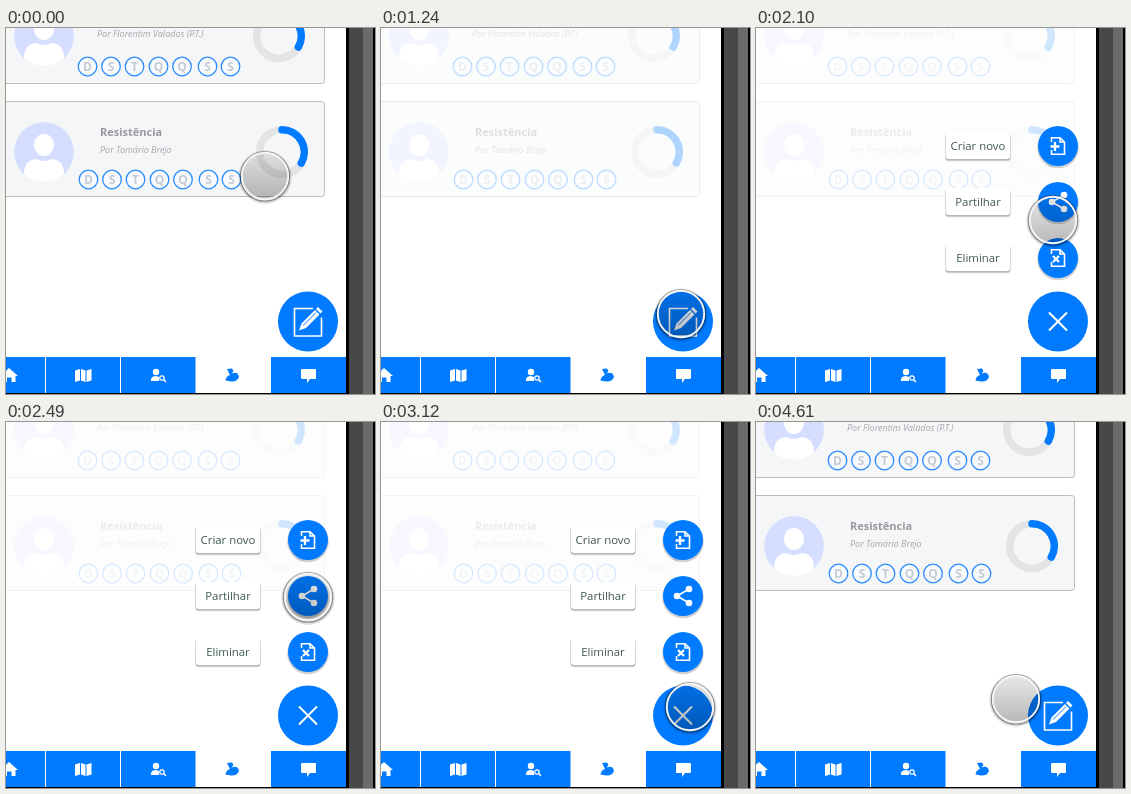
These frames come from a looping animation (369 px wide and 366 px high, 4680 ms). An HTML page:

```html
<!DOCTYPE html>
<html lang="pt">
<head>
<meta charset="utf-8">
<title>Treinos</title>
<style>
html, body { margin: 0; height: 100%; overflow: hidden; background: #fff; }
svg { display: block; width: 100vw; height: 100vh; font-family: "Open Sans", "Noto Sans", sans-serif; }
.title { font-size: 11px; font-weight: 700; fill: #98989c; }
.author { font-size: 9px; font-style: italic; fill: #a6a6aa; }
.day { font-size: 12px; font-weight: 700; fill: #c6cad2; text-anchor: middle; }
.label { font-size: 11.4px; fill: #3d5a4a; text-anchor: middle; }
.line { fill: none; stroke: #fff; stroke-width: 1.6; }
</style>
</head>
<body>
<svg viewBox="0 0 369 366" preserveAspectRatio="none">
  <defs>
    <linearGradient id="glass" x2="0" y2="1">
      <stop offset="0" stop-opacity=".09"/>
      <stop offset="1" stop-opacity=".28"/>
    </linearGradient>
    <clipPath id="disc"><circle r="30"/></clipPath>
  </defs>

  <g id="cards"></g>

  <g id="tabs" fill="#fff">
    <path fill="#007bff" d="M0 329H340V365H0Z"/>
    <path d="M39 329h1v36h-1zM114 329h1v36h-1zM189.500 329H265v36h-75.500z"/>
    <path d="M3 340L12 348H9.500V354H5.500V349.500H1V354H-4V348H-6Z"/>
    <path d="M69 342.500L74 341V352.500L69 354ZM75 341L79.500 342.500V354L75 352.500ZM80.500 342.500L85.500 341V352.500L80.500 354Z"/>
    <circle cx="150" cy="344" r="3.200"/>
    <path d="M145 353V351Q146 348 150 348L153 349V353Z"/>
    <circle cx="156" cy="350" r="2.200" fill="none" stroke="#fff" stroke-width="1.200"/>
    <path d="M157.500 351.500L160 354" stroke="#fff" stroke-width="1.400"/>
    <path fill="#007bff" d="M221 341L226 340.500 227.500 343 225.500 345.500Q232 343 233 349Q231 354 225 353.500L219.500 352.500Q220 348 224 347L222.500 344Z"/>
    <path d="M296 341H309Q310 341 310 342V350Q310 351 309 351H304L301 355V351H296Q295 351 295 350V342Q295 341 296 341Z"/>
  </g>

  <g id="bezel">
    <path d="M340 0H369V366H0V365H340Z"/>
    <path fill="#484848" d="M343 0H357V366H343Z"/>
    <path fill="#6a6a6a" d="M357 0H367V366H357Z"/>
  </g>

  <g id="menu"></g>

  <g transform="translate(302 293.500)">
    <circle r="30" fill="#007bff"/>
    <g id="pencil">
      <path class="line" stroke-width="2" d="M5-13H-13.500V14.500H13.500V-4"/>
      <path fill="#fff" d="M-9 9L-6.500 2 7-11.500 11.500-7-2 6.500Z"/>
      <path fill="#fff" d="M8-12.500L10-14.500 14.500-10 12.500-8Z"/>
      <path d="M-5 4L8-9" stroke="#007bff" fill="none"/>
    </g>
    <path id="cross" class="line" style="stroke-width:2" d="M-9-9L9 9M9-9L-9 9"/>
  </g>

  <g id="pointer">
    <g fill="none" stroke="#000">
      <circle cy="1.200" r="25.200" stroke-width="3" opacity=".12"/>
      <circle cy=".6" r="24.500" stroke-width="1.500" opacity=".4"/>
    </g>
    <circle r="24" fill="url(#glass)"/>
    <circle r="23.200" fill="none" stroke="#f6f6f6" stroke-width="1.900"/>
    <circle id="press" cy="2" r="11.500" opacity=".18"/>
  </g>
</svg>

<script>
const LOOP = 4680, TICK = 78;
const $ = id => document.getElementById(id);
const clamp = x => Math.max(0, Math.min(1, x));

// shared artwork
const days = [...'DSTQQSS'];
const dayX = [0, 23.5, 47, 71, 94.5, 120, 143];

function card(y, h, x, mid, dayY, ringX, title, author, authorX) {
  const chips = days.map((d, i) => `<g transform="translate(${x + dayX[i]} ${dayY})">
    <circle r="9.300" fill="#f8fafc" stroke="#2b8cff" stroke-width="1.300"/>
    <text class="day" y="4.400">${d}</text></g>`).join('');
  return `<rect x="-10" y="${y}" width="328.500" height="${h}" rx="3" fill="#f5f6f8" stroke="#bdbdbd"/>
    <g transform="translate(38 ${mid})" clip-path="url(#disc)">
      <circle r="30" fill="#d6deff"/>
      <ellipse cy="-7" rx="10" ry="11" fill="#fff"/>
      <path d="M-20 31V20Q-19 8-8 7Q0 11 8 7Q19 8 20 20V31Z" fill="#fff"/>
    </g>
    <text class="title" x="94" y="${mid - 16}">${title}</text>
    <text class="author" x="${authorX}" y="${mid + 1}">Por ${author}</text>${chips}
    <g transform="translate(${ringX} ${mid})" fill="none" stroke-width="7.500" stroke-linecap="round">
      <circle r="22.300" stroke="#e3e4e6"/>
      <path d="M0-22.300A22.300 22.300 0 0 1 19.300 11.100" stroke="#007bff"/>
    </g>`;
}

$('cards').innerHTML =
  card(-39.5, 95, 81.5, 8, 38.5, 273, '', 'Florentim Valados (P.T.)', 91) +
  card(73.5, 95, 82.5, 124, 151.5, 276, 'Resistência', 'Tomário Brejo', 94);

const file = mark => `<path class="line" d="M-6.500-4V-8.200H2L6.500-3.800V8.200H-6.500V4M2-8V-4H6"/>
  <path class="line" style="stroke-width:2.300" d="${mark}"/>`;
const share = `<path class="line" d="M6-7L-6 0 6 7"/><g fill="#fff">
  <circle cx="-6" r="3.300"/><circle cx="6" cy="-7" r="3.300"/><circle cx="6" cy="7" r="3.300"/></g>`;
const items = [
  ['Eliminar', 230, file('M-5-2L1 4M1-2L-5 4')],
  ['Partilhar', 174, share],
  ['Criar novo', 118, file('M-7.500 .5H1.500M-3-4V5')]
];
$('menu').innerHTML = items.map(([name, y, icon]) => `<g>
  <rect x="189" y="${y - 13}" width="66" height="28.500" rx="4" opacity=".1"/>
  <rect x="189.700" y="${y - 13}" width="64.600" height="27.500" rx="3" opacity=".2"/>
  <rect x="190" y="${y - 14}" width="64" height="27" rx="3" fill="#fff"/>
  <text class="label" x="222" y="${y + 4}">${name}</text>
  <g transform="translate(302 ${y})">
    <circle cy="1.500" r="20.800" opacity=".18"/><circle r="20" fill="#007bff"/>${icon}
  </g></g>`).join('');

// pointer path: tick, x, y
const path = [
  [0, 259, 148], [1, 262, 160], [3, 282, 240], [4, 293, 283], [5, 298, 302],
  [6, 299, 307], [7, 300, 286], [22, 300, 286], [23, 299, 276], [25, 294, 234],
  [27, 297, 192], [29, 305, 135], [30, 305, 125], [31, 303, 150], [32, 302, 175],
  [34, 300, 137], [35, 305, 185], [36, 309, 245], [37, 312, 290], [38, 309, 285],
  [50, 309, 285], [53, 305, 298], [57, 305, 298], [58, 287, 291], [59, 260, 277]
];

function pointerAt(n) {
  const i = Math.max(1, path.findIndex(p => p[0] >= n));
  const [a, x, y] = path[i - 1], [b, u, v] = path[i];
  const k = (n - a) / (b - a);
  return [x + (u - x) * k, y + (v - y) * k];
}

function draw(now) {
  const n = Math.min(59, Math.floor((now % LOOP + 12) / TICK));
  const closing = clamp((n - 50) / 3);
  const open = clamp((n - 18) / 3) * (1 - closing);

  const dim = n < 16 ? 1 : n < 19 ? .31 : .31 - .13 * clamp((n - 18) / 3);
  $('cards').setAttribute('opacity', dim + (1 - dim) * closing);

  [...$('menu').children].forEach((g, i) => {
    const s = clamp((n - 18 - i) / 3);
    const y = items[i][1];
    g.setAttribute('opacity', s * (1 - closing));
    g.setAttribute('transform', `translate(302 ${y}) scale(${.4 + .6 * s}) translate(-302 ${-y})`);
  });

  $('pencil').setAttribute('opacity', 1 - open);
  $('cross').setAttribute('opacity', open);
  $('cross').setAttribute('transform', `rotate(${90 * (open - 1)})`);

  $('pointer').setAttribute('transform', `translate(${pointerAt(n)})`);
  $('press').style.display = n === 8 || n === 38 || n === 39 ? '' : 'none';
}

const start = performance.now();
function loop() {
  draw(performance.now() - start);
  requestAnimationFrame(loop);
}
loop();
</script>
</body>
</html>
```
